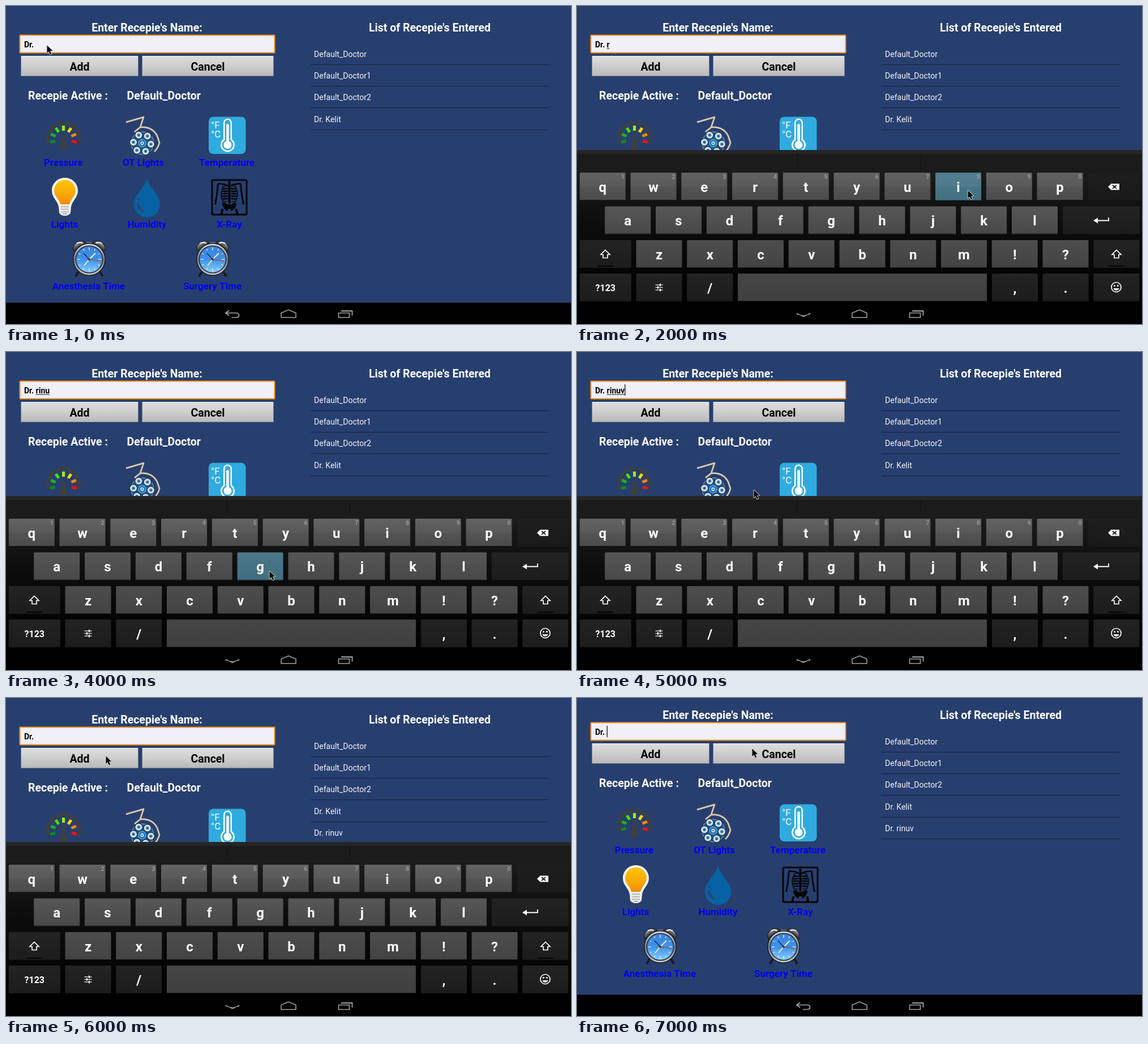
An HTML page with a canvas for the animation above (7.5 s loop, 998 by 561 pixels).

```html
<!DOCTYPE html>
<html lang="en">
<head>
<meta charset="utf-8">
<title>Recepie entry</title>
<style>
html, body { margin: 0; width: 100%; height: 100%; overflow: hidden; background: #273f6f; }
canvas { display: block; }
</style>
</head>
<body>
<canvas id="stage" width="998" height="561"></canvas>
<script>
const c = document.getElementById('stage').getContext('2d');
const STEP = 500, LOOP = 7500, TAU = Math.PI * 2;
const BG = '#273f6f';

// pointer tip at each step
const pointer = [[72, 69], [83, 64], [190, 386], [200, 375], [690, 325], [605, 443], [610, 431],
  [500, 395], [465, 386], [545, 387], [312, 243], [177, 104], [176, 102], [262, 92], [309, 89]];
const typed = ['', '', '', 'r', 'r', 'ri', 'rin', 'rin', 'rinu', 'rinu', 'rinuv', 'rinuv', '', '', ''];
const held = { 2: 's', 4: 'i', 5: 'n', 8: 'g', 9: 'h' };
const caretOn = [1, 3, 5, 7, 9, 10, 13, 14];

function text(s, x, y, size, color, align = 'left', weight = 'bold') {
  c.font = `${weight} ${size}px Roboto, sans-serif`;
  c.fillStyle = color;
  c.textAlign = align;
  c.fillText(s, x, y);
}
function rect(x, y, w, h, fill) { c.fillStyle = fill; c.fillRect(x, y, w, h); }
function round(x, y, w, h, r, fill) {
  c.beginPath(); c.roundRect(x, y, w, h, r);
  c.fillStyle = fill; c.fill();
}
function disc(x, y, r, fill) {
  c.beginPath(); c.arc(x, y, r, 0, TAU);
  c.fillStyle = fill; c.fill();
}
function path(d, stroke, width, fill) {
  const p = new Path2D(d);
  if (fill) { c.fillStyle = fill; c.fill(p); }
  if (stroke) { c.strokeStyle = stroke; c.lineWidth = width; c.stroke(p); }
}
function fade(y0, y1, ...colors) {
  const g = c.createLinearGradient(0, y0, 0, y1);
  colors.forEach((k, i) => g.addColorStop(i / (colors.length - 1), k));
  return g;
}

function button(label, x, w, pressed) {
  rect(x, 88, w, 36, '#777d88');
  rect(x + 1, 88, w - 2, 35, pressed ? '#fca103' : fade(88, 123, '#dedede', '#cecece', '#b9b9bb'));
  if (!pressed) rect(x + 1, 88, w - 2, 1, '#eeeeee');
  text(label, x + w / 2, 114, 19.5, '#000', 'center');
}

function field(i) {
  round(23.5, 50.5, 452, 33, 2, '#f7941d');
  rect(25.5, 52.5, 448, 29, '#f0f0f6');
  const word = typed[i];
  text('Dr. ', 32, 73, 14, '#000');
  const x = 32 + c.measureText('Dr. ').width;
  const w = c.measureText(word).width;
  text(word, x, 73, 14, '#000');
  if (word) rect(x, 74.5, w, 1, '#111');
  if (caretOn.includes(i)) rect(x + w, 57, 1.3, 20, '#111');
}

function gauge() {
  c.strokeStyle = '#3e3f41'; c.lineWidth = 5;
  c.beginPath(); c.arc(101.5, 234, 28, Math.PI * .9, Math.PI * 2.1); c.stroke();
  const colors = ['#12891c', '#1fb314', '#41e000', '#a4ee00', '#ffd800', '#ff8500', '#f60f0f'];
  c.lineWidth = 5;
  colors.forEach((k, n) => {
    const a = Math.PI * (.93 + n * 1.14 / 6);
    c.strokeStyle = k;
    c.beginPath();
    c.moveTo(101.5 + 15 * Math.cos(a), 235 + 15 * Math.sin(a));
    c.lineTo(101.5 + 24 * Math.cos(a), 235 + 24 * Math.sin(a));
    c.stroke();
  });
  path('M101.5 220 L107 244 A6.5 6.5 0 1 1 96 244Z', null, 0, '#3e3f41');
}

function surgicalLamp() {
  c.lineJoin = 'round';
  const arm = 'M212 205 L243 196 L237 214 Q258 212 267 229 L271 241 Q269 250 262 257 M237 214 L227 222';
  path(arm, '#56514c', 4);
  path(arm, '#d5cfc5', 2.4);
  disc(241, 242, 20, '#1a5a94');
  c.strokeStyle = '#9fb2c6'; c.lineWidth = 1;
  c.stroke();
  for (let n = 0; n < 7; n++) {
    const a = n * TAU / 6 + .12, r = n < 6 ? 15.5 : 0;
    const x = 240.5 + r * Math.cos(a), y = 242 + r * Math.sin(a);
    disc(x, y, 7.2, n < 6 ? '#202f43' : '#58b6ee');
    disc(x, y, 6, n < 6 ? '#d7e4ee' : '#2776b9');
    disc(x, y, 3, n < 6 ? '#4d91c4' : '#e3edf4');
    disc(x, y, 1.2, '#173757');
  }
}

function thermometer() {
  const blue = '#30abe0';
  round(358, 195.5, 65.5, 65.5, 8, blue);
  round(384, 198.5, 15, 49, 7.5, '#fff');
  disc(391.5, 245, 12.5, '#fff');
  round(386.5, 201, 10, 42, 5, blue);
  disc(391.5, 245, 9.8, blue);
  round(389.2, 208, 4.6, 36, 2.3, '#fff');
  disc(391.5, 245, 7, '#fff');
  text('°F', 362, 216, 17, '#fff', 'left', 'normal');
  text('°C', 362, 232, 17, '#fff', 'left', 'normal');
}

function bulb() {
  path('M104 303 C117 303 127 313 127 326 C127 338 117 343 115 354 L114 365 Q111 370 104 370 Q97 370 94 365 L93 354 C91 343 81 338 81 326 C81 313 91 303 104 303Z', null, 0, '#f1f1f1');
  path('M104 307 C115 307 123 315 123 326 C123 336 114 340 112 350 L96 350 C94 340 85 336 85 326 C85 315 93 307 104 307Z', null, 0, fade(307, 350, '#ffc400', '#fbad05', '#f28a0d'));
  for (let y = 353; y < 364; y += 4.5) rect(97, y, 14, 2.2, '#b8babd');
  rect(100, 366, 8, 1.5, '#999da3');
}

function drop() {
  path('M249 303 C252 321 272 332 272 350 A23 23 0 0 1 226 350 C226 332 246 321 249 303Z', null, 0, '#0662a3');
  c.lineCap = 'round';
  path('M233 349 Q234 358 242 362', '#304371', 4);
  path('M233.5 340 L233.5 341', '#304371', 4);
  c.lineCap = 'butt';
}

function xray() {
  c.beginPath(); c.roundRect(364, 307, 61, 61, 2);
  c.strokeStyle = '#06070a'; c.lineWidth = 3; c.stroke();
  rect(392.5, 309, 4, 40, '#06070a');
  path('M374 313 L388 315 L394.5 319 L401 315 L415 313', '#06070a', 2.5);
  for (let s = -1; s <= 1; s += 2) {
    for (let n = 0; n < 6; n++) {
      const y = 318 + n * 4.4, w = 11 + 3 * Math.sin(n * .6);
      path(`M394.5 ${y} Q${394.5 + s * w * 1.3} ${y - 3} ${394.5 + s * w} ${y + 5} L${394.5 + s * 4} ${y + 5}`, '#06070a', 1.6);
    }
    path(`M${394.5 + s * 20} 314 L${394.5 + s * 22} 333 L${394.5 + s * 25} 350`, '#06070a', 3);
    path(`M${394.5 + s * 2} 352 Q${394.5 + s * 10} 342 ${394.5 + s * 13} 350 Q${394.5 + s * 9} 360 ${394.5 + s * 3} 362Z`, null, 0, '#06070a');
    path(`M${394.5 + s * 12} 358 L${394.5 + s * 14} 367`, '#06070a', 4);
  }
  rect(391, 350, 7, 8, '#06070a');
}

function clock(x) {
  c.save();
  c.translate(x, 447);
  path('M-18 20 L-24 30 M18 20 L24 30', '#191b1f', 4);
  path('M-5 -29 L5 -29 M0 -29 L0 -24', '#73777d', 3);
  for (let s = -1; s <= 1; s += 2) {
    c.save();
    c.scale(s, 1);
    c.translate(18, -24);
    c.rotate(.6);
    path('M-13 4 A13 11 0 0 1 13 4Z', '#25272c', 1.5, fade(-9, 5, '#e3e5e8', '#60646b', '#14161a'));
    path('M-8 0 Q-4 -6 1 -6', '#f5f5f5', 2);
    c.restore();
  }
  disc(0, 0, 29, '#16181c');
  disc(0, 0, 27.5, fade(-28, 28, '#d6d9dd', '#777b82', '#c6c9ce'));
  disc(0, 0, 24.5, '#23272f');
  disc(0, 0, 23, fade(-23, 23, '#3e83dc', '#3c91ee', '#8accfc'));
  for (let n = 0; n < 12; n++) {
    c.save();
    c.rotate(n * TAU / 12);
    rect(-.7, -21, 1.4, n % 3 ? 3 : 5, '#e6f2ff');
    c.restore();
  }
  path('M-9 11 L0 0 L11 -11', '#eef5ff', 1.8);
  path('M-10 -11 L0 0', '#1c3050', 1.6);
  path('M-5 -1 L20 3', '#a4563c', 1.5);
  disc(0, 0, 2, '#33343a');
  c.restore();
}

function form(i) {
  text("Enter Recepie's Name:", 249, 44.5, 19.5, '#fff', 'center');
  text("List of Recepie's Entered", 748.5, 44.5, 19.5, '#fff', 'center');
  field(i);
  button('Add', 26, 208, false);
  button('Cancel', 240, 233, i === 13);
  text('Recepie Active :', 39, 164.5, 19.5, '#fff');
  text('Default_Doctor', 213.5, 164.5, 19.5, '#fff');

  const rows = ['Default_Doctor', 'Default_Doctor1', 'Default_Doctor2', 'Dr. Kelit'];
  if (i >= 12) rows.push('Dr. rinuv');
  rows.forEach((s, n) => {
    text(s, 544, 90 + n * 38.2, 14.04, '#f4f5f8', 'left', 'normal');
    rect(538, Math.round(103 + n * 38.2), 421, 1, '#15213d');
  });

  gauge(); surgicalLamp(); thermometer();
  bulb(); drop(); xray();
  clock(147); clock(365);
  const labels = [['Pressure', 101, 282], ['OT Lights', 242.5, 282], ['Temperature', 390, 282],
    ['Lights', 103.5, 391], ['Humidity', 249, 391], ['X-Ray', 394.5, 391],
    ['Anesthesia Time', 146, 500], ['Surgery Time', 364.5, 500]];
  labels.forEach(([s, x, y]) => text(s, x, y, 17, '#0000f4', 'center'));
}

function key(label, x, y, w, tone, down, size = 24) {
  round(x, y, w, 49, 1.5, fade(y, y + 49, tone[0], tone[1]));
  rect(x + 1, y + 48, w - 2, 1, '#191919');
  if (down) round(x, y, w, 49, 1.5, 'rgba(51,181,229,.35)');
  if (label) text(label, x + w / 2, y + (size < 20 ? 30.5 : 33.5), size, '#fff', 'center');
}

function keyboard(down) {
  rect(0, 254, 998, 270, fade(254, 524, '#202020', '#0c0c0c', '#000000'));
  rect(0, 254, 998, 7, '#262626');
  rect(0, 261, 998, 29, '#1b1b1b');
  rect(389, 261, 1, 23, '#111');
  rect(607, 261, 1, 23, '#111');
  const dark = ['#232323', '#1c1c1c'], P = 89.75;
  [...'qwertyuiop'].forEach((k, n) => {
    const x = 4.8 + n * P;
    key(k, x, 294, 81, ['#5d5d5d', '#4b4b4b'], k === down);
    rect(x, 294, 81, 25, 'rgba(255,255,255,.03)');
    text((n + 1) % 10, x + 79, 304.5, 10.5, '#989898', 'right');
  });
  key('', 903, 294, 91, ['#1e1e1e', '#191919']);
  [...'asdfghjkl'].forEach((k, n) => key(k, 49.2 + n * P + n * .1, 353.5, 81, ['#575757', '#484848'], k === down));
  key('', 858, 353.5, 136, dark);
  key('', 4.8, 413, 91, dark);
  [...'zxcvbnm!?'].forEach((k, n) => key(k, 104.5 + n * P, 413, 81, ['#4d4d4d', '#434343'], k === down));
  key('', 912.3, 413, 81, dark);
  key('?123', 4.8, 472, 91, dark, false, 16);
  key('', 104.5, 472, 81, dark);
  key('/', 194.3, 472, 81, dark);
  key('', 284, 472, 440, ['#454545', '#3f3f3f']);
  key(',', 733, 472, 81, dark);
  key('.', 822.6, 472, 81, dark);
  key('', 912.3, 472, 81, dark);

  // backspace, enter, shifts, sliders, smiley
  path('M938 319 L943.5 313.5 L958 313.5 L958 324.5 L943.5 324.5Z', null, 0, '#fff');
  path('M946 316 L953 322 M953 316 L946 322', '#1c1c1c', 1.8);
  path('M939 373 L939 378.5 L918 378.5', '#fff', 1.8);
  path('M912 378.5 L920 373.5 L920 383.5Z', null, 0, '#fff');
  [50, 953].forEach(x => {
    path(`M${x} 430.5 L${x + 8} 438.5 L${x + 4} 438.5 L${x + 4} 444.5 L${x - 4} 444.5 L${x - 4} 438.5 L${x - 8} 438.5Z`, '#fff', 1.7);
    rect(x - 14, 458, 28, 2, '#050505');
  });
  [492, 496.5, 501].forEach((y, n) => {
    rect(138.5, y - .7, 13, 1.4, '#ddd');
    rect(n % 2 ? 142 : 146, y - 2.3, 1.8, 4.6, '#fff');
  });
  c.beginPath(); c.arc(952.5, 496, 8.5, 0, TAU);
  c.strokeStyle = '#fff'; c.lineWidth = 1.7; c.stroke();
  disc(949.5, 493.5, 1.5, '#fff'); disc(955.5, 493.5, 1.5, '#fff');
  path('M947.5 498 A5.2 5.2 0 0 0 957.5 498Z', null, 0, '#fff');
}

function navBar(open) {
  rect(0, 523.5, 998, 37.5, '#000');
  const gray = '#a5a5a5';
  c.lineJoin = 'miter';
  if (open) path('M388.5 542.5 L400 548 L411.5 542.5 L411.5 543.5 L400 546.5 L388.5 543.5Z', gray, 1.2);
  else {
    path('M394 537 L388 541.5 L394 546 M388 541.5 L406 541.5 Q411.5 541.5 411.5 545.5 Q411.5 549.5 406 549.5 L399 549.5', gray, 1.7);
  }
  path('M486 549.5 L486 541.5 L499 536 L512 541.5 L512 549.5Z', gray, 1.5);
  path('M587.5 541.5 H606.5 V549.5 H587.5Z', gray, 1.6);
  path('M592 538 H611.5 V546', gray, 1.8);
}

function handle() {
  path('M53.3 80 L63.5 89.5 V106 Q63.5 108 61.5 108 H45 Q43 108 43 106 V89.5Z', '#1478a8', .8, fade(80, 108, '#30a8de', '#168fc8'));
}

function arrow([x, y]) {
  c.save();
  c.translate(x, y);
  c.lineJoin = 'round';
  path('M.5 .5 L.5 14 L3.6 11.2 L6 16.5 L8.4 15.4 L6 10.3 L10.3 10Z', '#e8e8e8', 1.6);
  path('M.5 .5 L.5 14 L3.6 11.2 L6 16.5 L8.4 15.4 L6 10.3 L10.3 10Z', null, 0, '#050505');
  c.restore();
}

function draw(now) {
  const i = Math.floor((now % LOOP) / STEP);
  const open = i >= 1 && i <= 12;
  rect(0, 0, 998, 561, BG);
  c.save();
  if (i >= 13) c.translate(0, -8);
  form(i);
  c.restore();
  if (open) keyboard(held[i]);
  if (i === 13) {
    c.save();
    c.translate(0, 19);
    c.globalAlpha = .3;
    keyboard();
    c.restore();
    rect(0, 268, 998, 4.5, '#242729');
  }
  navBar(open);
  if (i === 1) handle();
  arrow(pointer[i]);
}

let start;
function tick(now) {
  start ??= now;
  draw(now - start);
  requestAnimationFrame(tick);
}
draw(0);
requestAnimationFrame(tick);
</script>
</body>
</html>
```
